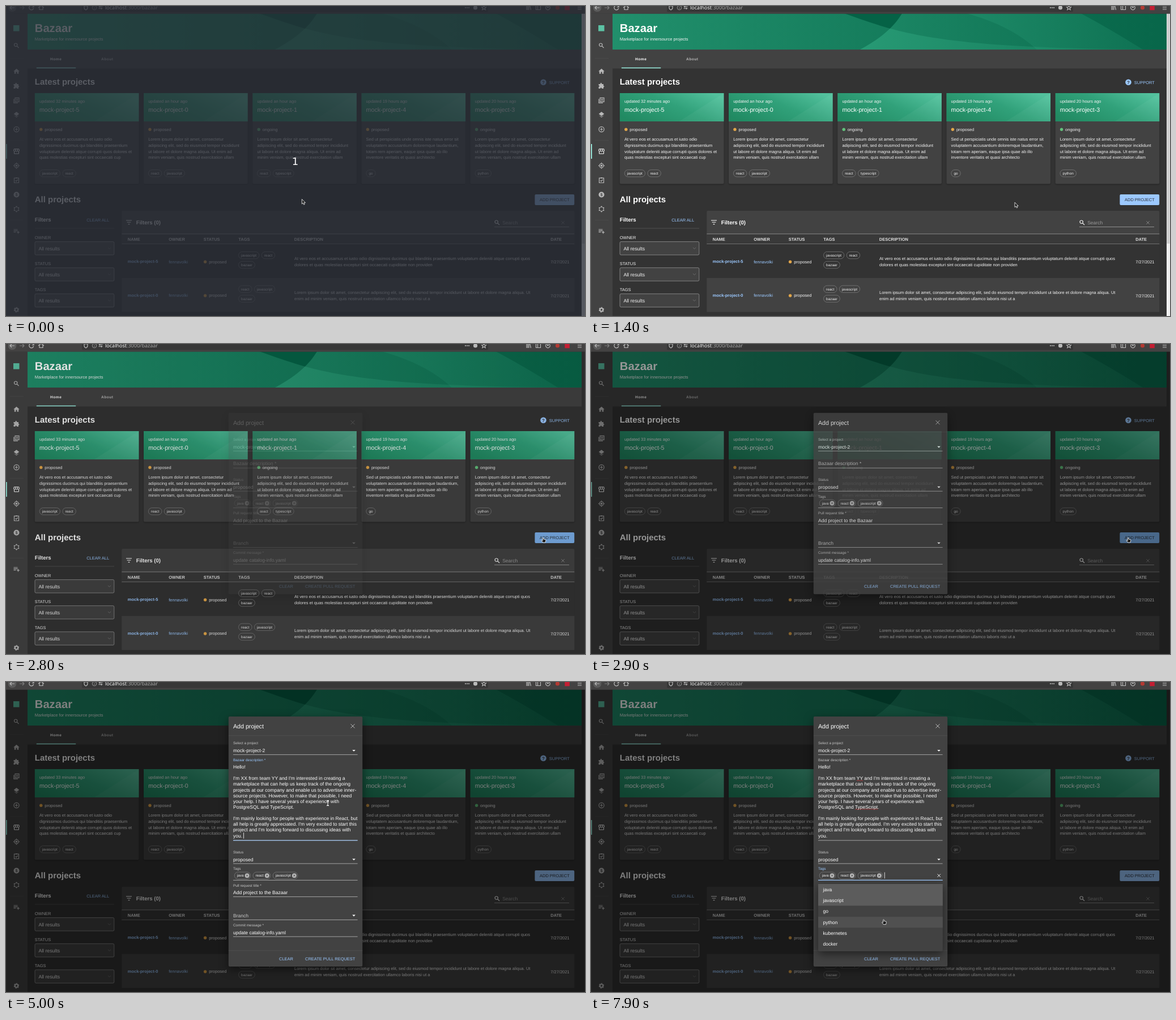
Write an HTML page that moves like this. It is 1022 by 548 pixels and loops after 8000 ms.

```html
<!DOCTYPE html>
<html lang="en">
<head>
<meta charset="utf-8">
<title>Add a project</title>
<style>
  html, body { margin: 0; width: 100%; height: 100%; overflow: hidden; background: #333; }
  svg { display: block; width: 1022px; height: 548px; }
  text { font-family: "Liberation Sans", Arial, sans-serif; text-rendering: geometricPrecision; white-space: pre; }
  .icon { fill: none; stroke: #b9b9b9; stroke-width: 1.2; }
  .card { filter: drop-shadow(0 1px 1px rgba(0, 0, 0, .35)); }
  .paper { filter: drop-shadow(0 5px 8px rgba(0, 0, 0, .5)); }
</style>
</head>
<body>
<svg id="stage" viewBox="0 0 1022 548" xmlns="http://www.w3.org/2000/svg"></svg>
<script>
const LOOP = 8000, STEP = 100;
const BLUE = '#9cc9ff', MINT = '#9bf0e1', PAPER = '#424242', PAGE = '#333', SOFT = '#c6c6c6';
const BODY = 7.47, INPUT = 8.53, SMALL = 6.4;

const ruler = document.createElement('canvas').getContext('2d');
ruler.font = '100px "Liberation Sans", Arial, sans-serif';
const widthOf = (s, size) => ruler.measureText(s).width * size / 100;

const text = (x, y, s, size = BODY, fill = '#f4f4f4', extra = '') =>
  `<text x="${x}" y="${y}" font-size="${size}" fill="${fill}" ${extra}>${s}</text>`;
const bold = (x, y, s, size = BODY, fill = '#fff', extra = '') =>
  text(x, y, s, size, fill, 'font-weight="700" ' + extra);
const rect = (x, y, w, h, fill, extra = '') =>
  `<rect x="${x}" y="${y}" width="${w}" height="${h}" fill="${fill}" ${extra}/>`;
const line = (x1, x2, y, stroke, w = .8, extra = '') =>
  `<path d="M${x1} ${y}H${x2}" stroke="${stroke}" stroke-width="${w}" ${extra}/>`;
const dot = (x, y, r, fill, extra = '') => `<circle cx="${x}" cy="${y}" r="${r}" fill="${fill}" ${extra}/>`;
const icon = (x, y, d, extra = '') => `<path class="icon" transform="translate(${x} ${y})" d="${d}" ${extra}/>`;
const cross = (x, y, r, stroke) =>
  `<path d="M${x - r} ${y - r}l${2 * r} ${2 * r}m0 ${-2 * r}l${-2 * r} ${2 * r}" stroke="${stroke}" stroke-width=".9"/>`;
const triangle = y => `<path d="M611.2 ${y - 1.2}h5.6l-2.8 2.8z" fill="#fff"/>`;

function chips(x, y, labels, removable) {
  return labels.map(label => {
    const tw = widthOf(label, SMALL), w = tw + (removable ? 16.7 : 9.3);
    let out = rect(x, y - 6.2, w, 12.4, 'none', 'rx="6.2" stroke="#8c8c8c" stroke-width=".6"') +
      text(x + 4.6, y + 2.2, label, SMALL);
    if (removable) {
      const cx = x + tw + 10.6;
      out += dot(cx, y, 4, '#b8b8b8') + cross(cx, y, 1.6, PAPER);
    }
    x += w + 4.3;
    return out;
  }).join('');
}

const STATUS = { proposed: '#e2a64a', ongoing: '#62c17b' };
const LOREM = ['Lorem ipsum dolor sit amet, consectetur', 'adipiscing elit, sed do eiusmod tempor incididunt',
  'ut labore et dolore magna aliqua. Ut enim ad', 'minim veniam, quis nostrud exercitation ullam'];
const VERO = ['At vero eos et accusamus et iusto odio', 'dignissimos ducimus qui blanditiis praesentium',
  'voluptatum deleniti atque corrupti quos dolores et', 'quas molestias excepturi sint occaecati cup'];
const SED = ['Sed ut perspiciatis unde omnis iste natus error sit', 'voluptatem accusantium doloremque laudantium,',
  'totam rem aperiam, eaque ipsa quae ab illo', 'inventore veritatis et quasi architecto'];
const CARDS = [
  ['mock-project-5', '32 minutes', 'proposed', VERO, ['javascript', 'react']],
  ['mock-project-0', 'an hour', 'proposed', LOREM, ['react', 'javascript']],
  ['mock-project-1', 'an hour', 'ongoing', LOREM, ['react', 'typescript']],
  ['mock-project-4', '19 hours', 'proposed', SED, ['go']],
  ['mock-project-3', '20 hours', 'ongoing', LOREM, ['python']]];

function card([name, age, status, lines, tags], i) {
  return `<g transform="translate(${50.8 + 192.2 * i} 0)"><g class="card">` +
    rect(0, 154, 183.7, 160.5, PAPER, 'rx="2"') + '</g>' +
    rect(0, 154, 183.7, 50, 'url(#cardFill)') +
    '<path d="M105 204L183.7 154V204Z" fill="#fff" opacity=".04"/>' +
    text(8.2, 171.4, `updated ${age} ago`, BODY, '#f4f4f4', i ? '' : 'id="age"') +
    text(8.2, 187.2, name, 10.67, '#fff') +
    dot(11, 218.3, 2.7, STATUS[status]) + text(17.5, 220.9, status) +
    lines.map((s, k) => text(8.2, 238.2 + 10.67 * k, s)).join('') +
    chips(8.4, 295.8, tags) + '</g>';
}

const ROWS = [
  ['mock-project-5', ['javascript', 'react'], 'At vero eos et accusamus et iusto odio dignissimos ducimus qui blanditiis praesentium voluptatum deleniti atque corrupti quos',
    'dolores et quas molestias excepturi sint occaecati cupiditate non providen'],
  ['mock-project-0', ['react', 'javascript'], 'Lorem ipsum dolor sit amet, consectetur adipiscing elit, sed do eiusmod tempor incididunt ut labore et dolore magna aliqua. Ut',
    'enim ad minim veniam, quis nostrud exercitation ullamco laboris nisi ut a']];

const row = ([name, tags, a, b], i) =>
  `<g transform="translate(0 ${59.8 * i})">` + rect(204.3, 421, 799, 60, i ? PAPER : PAGE) +
  bold(214.8, 454.4, name, BODY, BLUE) + text(287.3, 454.6, 'fennavolki', BODY, BLUE) +
  dot(351.6, 452.2, 2.7, STATUS.proposed) + text(358.2, 454.6, 'proposed') +
  chips(410.5, 440.6, tags) + chips(410.5, 457.6, ['bazaar']) +
  text(509, 449.4, a) + text(509, 460.2, b) + text(961.3, 454.8, '7/27/2021') + '</g>';

const select = (label, y) => text(50.8, y + 2.7, label) +
  rect(51, y + 7.2, 139.8, 23.4, PAPER, 'rx="2" stroke="#a3a3a3" stroke-width=".7"') +
  text(57.4, y + 22.1, 'All results', 8.7) +
  icon(182.5, y + 18.8, 'M-2.5 -1.3L0 1.3L2.5 -1.3', 'style="stroke:#6c6c6c;stroke-width:1"');

const ring = r => `M${-r} 0a${r} ${r} 0 1 0 ${2 * r} 0a${r} ${r} 0 1 0 ${-2 * r} 0`;
const lens = 'M-4 -1.3a2.7 2.7 0 1 0 5.4 0a2.7 2.7 0 1 0 -5.4 0M.7 .7L4 4';

function sidebar() {
  const fill = 'style="fill:#b9b9b9;stroke:none"', at = (y, d, extra) => icon(18.5, y, d, extra);
  return rect(0, 13.5, 38, 535, PAPER) +
    rect(13, 34, 10.5, 10.5, '#5cc2a4') +
    at(70, lens) +
    at(115.5, 'M0 -4.8L5.3 0H3.7V4.3H1.1V1H-1.1V4.3H-3.7V0H-5.3Z', fill) +
    at(141, 'M-5 -3H-2V-4Q-.8 -6.5 .5 -4V-3H3.5V0Q6.5 1 3.5 2.5V5H.8Q-.8 1.5 -2.3 5H-5V2Q-2 .7 -5 -.7Z', fill) +
    at(166.8, 'M-2.5 -4.5H4.5V2.5H-2.5ZM-4.6 -2.5V4.6H2.5M-1 -2H3M-1 .2H3') +
    at(192, 'M0 -5L4.8 -1.3L0 2.4L-4.8 -1.3ZM-4.8 1.2L0 5L4.8 1.2L0 3.8Z', fill) +
    at(218, ring(4.6) + 'M0 -2.5V2.5M-2.5 0H2.5') +
    rect(0, 244, 1.7, 26, MINT) +
    at(256.8, 'M-4.3 -4H4.3L5 -.7Q3.3 1.5 1.7 -.5Q0 1.5 -1.7 -.5Q-3.3 1.5 -5 -.7ZM-4 .5V4.3H4V.5M-1.7 -4V-.5M1.7 -4V-.5', 'style="stroke:#fff;stroke-width:1"') +
    at(282.3, ring(3.6) + 'M0 -5.5V-3.6M0 3.6V5.5M-5.5 0H-3.6M3.6 0H5.5') + dot(18.5, 282.3, 1.8, '#b9b9b9') +
    at(308, 'M-4 -3.8H4V4.5H-4ZM-1.5 -4.5H1.5M-2 .4L-.5 1.9L2.3 -1.1') +
    dot(18.5, 333.5, 5, '#b9b9b9') + bold(16.5, 336.2, '$', 7.4, PAPER) +
    at(359, 'M0 -4L3.7 -2V2L0 4L-3.7 2V-2Z', 'style="stroke-width:.9"') +
    [0, 1, 2, 3, 4, 5].map(k => dot(18.5 + 4.3 * Math.sin(k * Math.PI / 3), 359 - 4.5 * Math.cos(k * Math.PI / 3), 1.1, '#b9b9b9')).join('') +
    at(398, 'M-5 -3H2M-5 -.7H2M-5 1.6H-1M3 -.2V4.4M.7 2.1H5.3') +
    at(537, ring(2.7), 'style="stroke-width:2"') +
    at(537, ring(4.1), 'style="stroke-width:1.2;stroke-dasharray:2.3 2"') +
    [92.5, 237.5, 378.5].map(y => line(7, 31, y, '#505050', .6)).join('');
}

function banner() {
  const wave = (d, left, right) => `<path d="${d}" fill="url(#${left})" opacity="${right}"/>`;
  return `<g clip-path="url(#banner)">${rect(38, 13.5, 978, 63.5, '#056246')}
    <g transform="translate(38 -97.75) scale(.715)">` +
    wave('M437 116C223 116 112 0 112 0h1256v400c-82 0-225-21-282-109-112-175-436-175-649-175z', 'fade', .3) +
    wave('M1368 400V282C891-29 788 40 711 161 608 324 121 372 0 361v39h1368z', 'fade', .6) +
    wave('M1368 244v156H0V94c92-24 198-46 375 0l135 41c176 51 195 109 858 109z', 'fade', .45) + '</g></g>';
}

function page() {
  const th = (x, s) => bold(x, 414.8, s, BODY, '#e2e2e2');
  return rect(0, 13.5, 1022, 535, PAGE) +
    rect(38, 77, 978, 33.5, PAPER) + banner() +
    bold(50.8, 46.3, 'Bazaar', 20.2) + text(50.8, 61.2, 'Marketplace for innersource projects') +
    bold(78, 96.4, 'Home', 6.6, '#fff', 'letter-spacing=".5"') +
    bold(168, 96.4, 'About', 6.6, '#b8b8b8', 'letter-spacing=".5"') +
    rect(53.8, 108.7, 69.4, 1.5, MINT) +
    bold(50.8, 139, 'Latest projects', 14.93) + bold(50.8, 346.6, 'All projects', 14.93) +
    dot(948.5, 134.7, 5.3, BLUE) + bold(946.1, 137.6, '?', 8, PAGE) + text(958.8, 137.6, 'SUPPORT', BODY, BLUE) +
    CARDS.map(card).join('') +
    rect(933.4, 333, 69.8, 19, BLUE, 'rx="2" id="add"') + text(942, 345.3, 'ADD PROJECT', BODY, '#2b2f36') +
    bold(50.8, 381.3, 'Filters', 9.6) + text(142.2, 380.8, 'CLEAR ALL', BODY, BLUE) +
    line(51, 191, 393, '#5c5c5c', .7) +
    select('OWNER', 409.4) + select('STATUS', 455.5) + select('TAGS', 501.6) +
    rect(204.3, 362, 799, 59, PAPER, 'rx="2"') + rect(204.3, 403, 799, 18, '#393939') +
    line(204.3, 1003.3, 402.9, '#a8a8a8', .7) + line(204.3, 1003.3, 420.8, '#a8a8a8', .7) +
    '<path d="M212 379H222M213.7 382.3H220.3M215.7 385.6H218.3" stroke="#fff" stroke-width="1.1"/>' +
    bold(229.8, 386.4, 'Filters (0)', 9.6) +
    icon(867, 383, lens, 'style="stroke:#f0f0f0"') + text(876.2, 386.3, 'Search', INPUT, '#9a9a9a') +
    cross(983, 383, 2.7, '#8a8a8a') + line(862, 994, 390.5, '#b0b0b0', .7) +
    th(214.8, 'NAME') + th(287.3, 'OWNER') + th(348.8, 'STATUS') + th(410.3, 'TAGS') + th(508.8, 'DESCRIPTION') + th(961.3, 'DATE') +
    ROWS.map(row).join('') + sidebar() +
    `<g id="scroll">${rect(1016, 13.5, 6, 535, '#f0f0f0')}${rect(1016.5, 14, 5, 406, '#cdcdcd')}</g>`;
}

function browserBar() {
  const ic = (x, d, extra) => icon(x, 3, d, extra);
  return rect(0, 0, 1022, 13.5, '#434242') + rect(134, -6, 717, 16.5, '#373737', 'rx="2"') +
    dot(11, 3, 7.3, '#5b5b5b') + ic(11, 'M4 0H-4M-1 -3L-4 0L-1 3') +
    ic(28, 'M-4 0H4M1 -3L4 0L1 3', 'opacity=".5"') +
    ic(45, 'M3 -2.5A4 4 0 1 0 3.7 1M4 -4V-1H1') + ic(62, 'M-5 0L0 -4L5 0M-3 -1V3.5H3V-1') +
    ic(141, 'M-3 -3H3V0Q3 3 0 4Q-3 3 -3 0Z') + ic(156, ring(3.7) + 'M0 -2V-1M0 0V2', 'opacity=".6"') +
    ic(167, 'M-3.5 -1.5H3.5M-3.5 1.5H3.5M-1.5 -3V0M1.5 0V3') +
    `<text x="175" y="6.3" font-size="9" fill="#a5a5a5" style="font-family:'Noto Sans',sans-serif"><tspan fill="#f5f5f5">localhost</tspan>:3000/bazaar</text>` +
    [-3, 0, 3].map(d => dot(814 + d, 3, 1, '#ccc')).join('') + dot(828.5, 3, 3.6, '#b9b9b9') +
    ic(843.5, 'M0 -4L1.2 -1.2L4 -1L1.8 .8L2.6 3.7L0 2L-2.6 3.7L-1.8 .8L-4 -1L-1.2 -1.2Z') +
    ic(922, 'M-3 -4V4M-1 -4V4M1 -4V4M2.5 -4L4.5 4') + ic(939.5, 'M-4 -3.5H4V3.5H-4ZM-1 -3.5V3.5') +
    ic(956.5, ring(3.8)) + dot(956.5, 2, 1.5, '#b9b9b9') +
    dot(973.5, 3, 3.6, '#b23a33') + rect(986.3, -1.2, 8.5, 8.5, '#c41e33') +
    ic(1012.5, 'M-3.5 -3H3.5M-3.5 0H3.5M-3.5 3H3.5');
}

const MESSAGE = ['Hello!', '', "I'm XX from team YY and I'm interested in creating a", 'marketplace that can help us keep track of the ongoing',
  'projects at our company and enable us to advertise inner-', 'source projects. However, to make that possible, I need',
  'your help. I have several years of experience with', 'PostgreSQL and TypeScript.', '',
  "I'm mainly looking for people with experience in React, but", "all help is greatly appreciated. I'm very excited to start this",
  "project and I'm looking forward to discussing ideas with", 'you. '];
const OPTIONS = ['java', 'javascript', 'go', 'python', 'kubernetes', 'docker'];
const LINE_H = 10.13, GROW = 60.8, OPTION_H = 19.22;

function squiggle(lead, word, y) {
  const x = 401 + widthOf(lead, INPUT), n = Math.round(widthOf(word, INPUT) / 1.6);
  let d = `M${x} ${y}`;
  for (let i = 0; i < n; i++) d += `l1.6 ${i % 2 ? 1.2 : -1.2}`;
  return `<path d="${d}" fill="none" stroke="#d9383a" stroke-width=".7"/>`;
}

function field(y, label, value, arrow, extra = '') {
  return text(401, y + 2.2, label, SMALL, SOFT, extra) + text(401, y + 16, value, INPUT, '#fff') +
    line(401, 620.6, y + 20.2, '#bcbcbc') + (arrow ? triangle(y + 12.9) : '');
}

function dialog() {
  return rect(392.8, 121.7, 236.4, 320.6, PAPER, 'id="paper" class="paper" rx="2"') +
    '<g id="upper">' + text(401, 143.2, 'Add project', 10.67, '#fff') + cross(612, 138.7, 3.5, '#c9c9c9') +
    line(392.8, 629.2, 155.6, '#575757', .6) + field(169, 'Select a project', 'mock-project-2', true) +
    text(401, 213.8, 'Bazaar description *', INPUT, SOFT, 'id="descLabel"') +
    `<g id="message">${MESSAGE.map((s, i) => text(401, 213.8 + LINE_H * i, s, INPUT, '#fff')).join('')}</g>` +
    `<g id="spelling">${squiggle("I'm XX from team ", 'YY', 235.6)}${squiggle('PostgreSQL and ', 'TypeScript', 286.3)}</g>` +
    rect(0, 0, .8, 10.5, '#fff', 'id="caret"') + '</g><g id="lower">' +
    line(401, 620.6, 219.2, '#bcbcbc', .8, 'id="descLine"') + line(401, 620.6, 219.2, BLUE, 1.2, 'id="descFocus"') +
    field(240, 'Status', 'proposed', true) +
    field(269.4, 'Tags', '', false, 'id="tagsLabel"') + chips(403.2, 281.4, ['java', 'react', 'javascript'], true) +
    `<g id="tagsHover">${cross(614.2, 281.4, 2.7, '#fff')}${line(401, 620.6, 289.6, '#fff', 1.1, 'id="tagsLine"')}</g>` +
    rect(517.8, 275.6, .8, 11, '#fff', 'id="tagsCaret"') +
    field(298.6, 'Pull request title *', 'Add project to the Bazaar') +
    text(401, 355, 'Branch', INPUT, SOFT) + triangle(352) + line(401, 620.6, 359.6, '#bcbcbc') +
    field(369.1, 'Commit message *', 'update catalog-info.yaml') +
    line(392.8, 629.2, 414, '#575757', .6) +
    text(482, 431.2, 'CLEAR', BODY, BLUE) + text(528, 431.2, 'CREATE PULL REQUEST', BODY, BLUE) + '</g>' +
    '<g id="menu"><g class="paper">' + rect(401, 357, 219.8, 119, PAPER, 'rx="2"') + '</g>' +
    rect(401, 357, 219.8, 38.4, '#5c5c5c') + rect(401, 415.1, 219.8, OPTION_H, '#505050', 'id="hover"') +
    OPTIONS.map((s, i) => text(409.6, 370 + OPTION_H * i, s, INPUT, '#fff')).join('') + '</g>';
}

const POINTERS = {
  arrow: '<path d="M0 0V8.5L2 6.7L3.4 9.7L4.9 9L3.6 6.2H6.2Z"/>',
  hand: '<path d="M-.8 .8Q0 -.5 .8 .8V3L4.5 3.8Q5 4 4.8 5.5L4 9H-.2L-3 5.5Q-2.5 4.3 -.8 5.5Z"/>',
  beam: '<path d="M-2 -4.5Q0 -4.5 0 -3.5Q0 -4.5 2 -4.5M0 -3.5V3.5M-2 4.5Q0 4.5 0 3.5Q0 4.5 2 4.5" stroke="#fff" stroke-width="1.5"/>' +
    '<path d="M0 -3.5V3.5" stroke="#222" stroke-width=".6"/>'
};

const stage = document.getElementById('stage');
stage.innerHTML = `<defs>
  <linearGradient id="fade"><stop stop-color="#43c79a"/><stop offset="1" stop-color="#43c79a" stop-opacity=".15"/></linearGradient>
  <linearGradient id="cardFill" x1="0" y1=".8" x2="1" y2=".2"><stop stop-color="#218a62"/><stop offset=".55" stop-color="#31a17a"/><stop offset="1" stop-color="#52c09c"/></linearGradient>
  <clipPath id="banner"><rect x="38" y="13.5" width="978" height="63.5"/></clipPath></defs>` +
  page() + rect(0, 13.5, 1022, 535, '#000', 'id="shade"') + `<g id="dialog">${dialog()}</g>` + browserBar() +
  `<g id="countdown">${rect(0, 0, 1022, 548, '#262a33', 'opacity=".76"')}
    <text x="510.5" y="281" font-size="18" fill="#fff" text-anchor="middle" style="font-family:'DejaVu Sans',sans-serif">1</text></g>` +
  Object.keys(POINTERS).map(k =>
    `<g id="${k}" fill="${k === 'beam' ? 'none' : '#1c1c1c'}" stroke="#fff" stroke-width=".8">${POINTERS[k]}</g>`).join('');

const el = id => document.getElementById(id);
const set = (id, attrs) => { for (const k in attrs) el(id).setAttribute(k, attrs[k]); };
const show = (id, on) => set(id, { visibility: on ? 'visible' : 'hidden' });
const clamp = v => Math.min(1, Math.max(0, v));
const ramp = (t, a, b) => clamp((t - a) / (b - a));
const ease = v => v * v * (3 - 2 * v);
const mix = (a, b, k) => a + (b - a) * k;

// Pointer stops: time, x, y
const PATH = [[0, 522.3, 341.5], [899, 522.3, 341.5], [900, 678, 349], [1100, 678, 349], [2000, 948, 342],
  [3100, 948, 342], [3600, 618.3, 215], [3800, 568, 214], [5700, 568, 214], [6500, 530, 349], [7400, 530, 349], [7900, 516.5, 419.6]];
const KINDS = [[1900, 'arrow'], [3200, 'hand'], [3600, 'arrow'], [6100, 'beam'], [6300, 'hand'], [7500, 'beam'], [LOOP, 'hand']];

function pointerAt(t) {
  const i = PATH.findIndex(p => p[0] > t);
  if (i < 0) return PATH[PATH.length - 1].slice(1);
  const [a, b] = [PATH[i - 1], PATH[i]], k = ease(ramp(t, a[0], b[0]));
  return [mix(a[1], b[1], k), mix(a[2], b[2], k)];
}

function draw(t) {
  const [x, y] = pointerAt(t), kind = KINDS.find(k => t < k[0])[1];
  for (const k in POINTERS) show(k, k === kind);
  set(kind, { transform: `translate(${x} ${y})` });
  show('countdown', t < 100);

  const open = ease(ramp(t, 2725, 2965));
  set('add', { fill: t >= 2000 && t < 3200 ? '#7bb0ea' : BLUE });
  el('age').textContent = `updated ${t < 2700 ? 32 : 33} minutes ago`;
  show('scroll', t < 2700);
  set('shade', { opacity: open * .5 });
  set('dialog', { opacity: open });

  const pasted = t >= 5000, grow = pasted ? GROW : 0;
  set('paper', { y: 121.7 - grow, height: 320.6 + 2 * grow });
  set('upper', { transform: `translate(0 ${-grow})` });
  set('lower', { transform: `translate(0 ${grow})` });
  show('message', pasted);
  show('spelling', t >= 5300);

  const focus = ramp(t, 3900, 4200), inDesc = t >= 4000 && t < 7000;
  set('descLabel', { y: mix(213.8, 201.3, focus), 'font-size': mix(INPUT, SMALL, focus), fill: inDesc ? BLUE : SOFT });
  const half = 109.8 * focus;
  set('descFocus', { d: `M${510.8 - half} 219.2h${2 * half}` });
  show('descFocus', inDesc);
  const hot = t >= 3600 && t < 4200;
  set('descLine', { stroke: hot ? '#fff' : '#bcbcbc', 'stroke-width': hot ? 1.1 : .8 });
  set('caret', pasted ? { x: 419.2, y: 327 } : { x: 401, y: 205.5 });
  show('caret', (t >= 4100 && t < 4500) || (t >= 5000 && t < 7000 && (t - 4800) % 1000 < 500));

  const inTags = t >= 7000;
  set('tagsLabel', { fill: inTags ? BLUE : SOFT });
  set('tagsLine', { stroke: inTags ? BLUE : '#fff' });
  show('tagsHover', t >= 6400);
  show('tagsCaret', inTags);
  show('menu', inTags);
  const over = Math.floor((y - 357) / OPTION_H);
  show('hover', inTags && over >= 0);
  set('hover', { y: 357.4 + OPTION_H * Math.max(0, over) });
}

const start = performance.now();
function tick() {
  const t = (performance.now() - start) % LOOP;
  draw(Math.floor(t / STEP) * STEP);
  requestAnimationFrame(tick);
}
tick();
</script>
</body>
</html>
```
